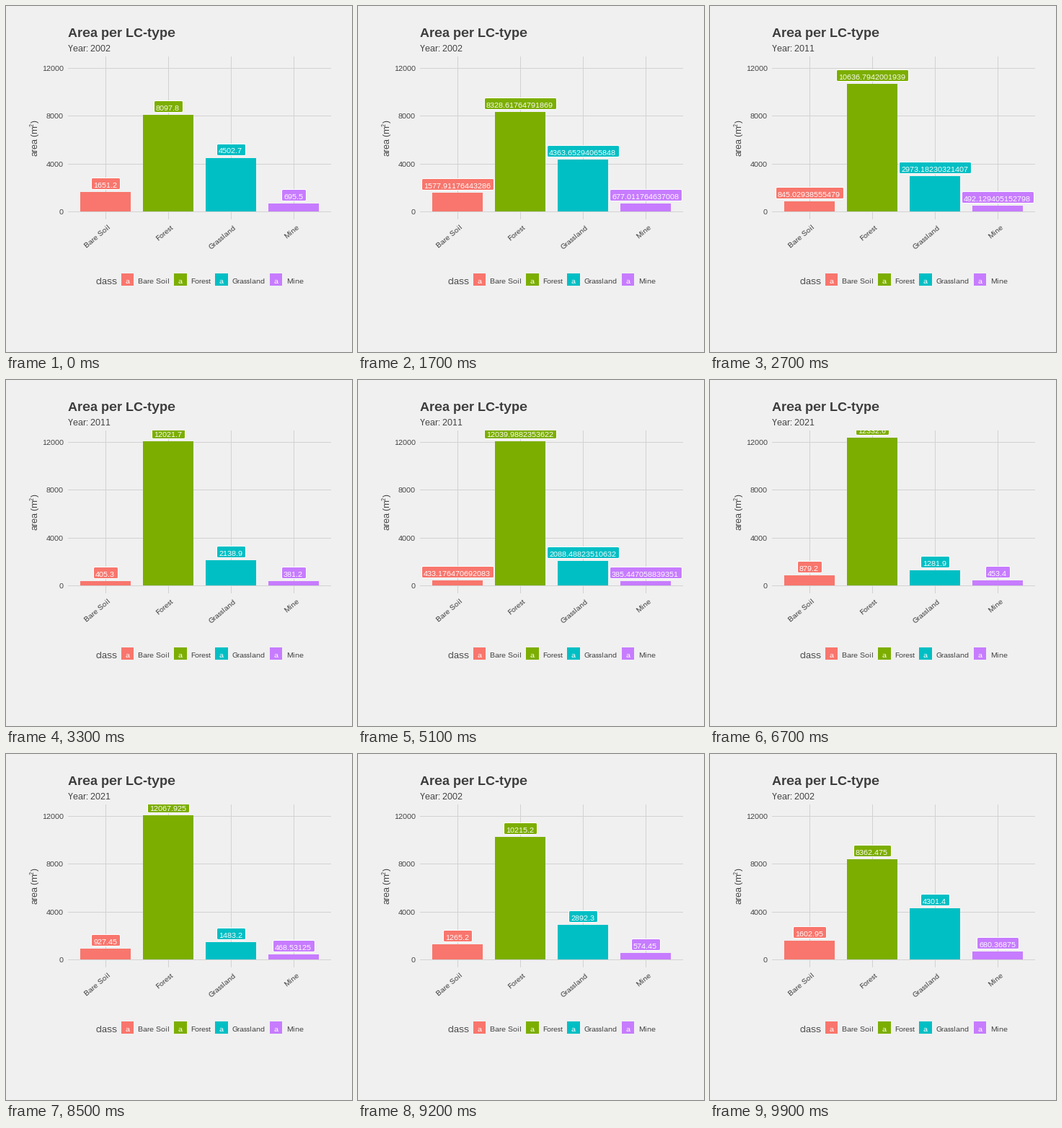
A matplotlib script that plays this animation: 480x480 px, repeating every 10000 ms.

```python
import numpy as np
import matplotlib.pyplot as plt
from matplotlib.animation import FuncAnimation
from matplotlib.patches import FancyBboxPatch, Rectangle

plt.rcParams.update({
    "font.family": "Liberation Sans",
    "text.hinting": "default",
    "text.hinting_factor": 1,
    "text.kerning_factor": 6,
    "mathtext.default": "regular",
    "toolbar": "None",
})

SIZE, DPI = 480, 100
PX = 72 / DPI                       # points per pixel
BG, GRID, INK = "#F0F0F0", "#D2D2D2", "#3C3C3C"
NAMES = ["Bare Soil", "Forest", "Grassland", "Mine"]
COLORS = ["#F8766D", "#7CAE00", "#00BFC4", "#C77CFF"]

YEARS = [2002, 2011, 2021]
AREAS = np.array([
    [1651.2, 8097.8, 4502.7, 695.5],
    [405.3, 12021.7, 2138.9, 381.2],
    [879.2, 12332.6, 1281.9, 453.4],
])
SPANS = [(16, 17), (50, 17), (84, 16)]   # last held step, length of the tween
FRAMES, INTERVAL = 100, 100

LEFT, RIGHT, TOP, BOTTOM = 86, 451, 70, 296
UNIT = (RIGHT - LEFT) / 4.2
CENTERS = LEFT + UNIT * (0.6 + np.arange(4))
ZERO, SCALE = 285.45, 0.01664
KEY = 17.28                         # legend key side
PAD, BOX_H = 3.6, 16                # label padding and height


def snap(v):
    return int(np.floor(v + 0.5))


def y_of(area):
    return ZERO - area * SCALE


def pixel_axes(x0, y0, x1, y1):
    ax = fig.add_axes([x0 / SIZE, 1 - y1 / SIZE,
                       (x1 - x0) / SIZE, (y1 - y0) / SIZE])
    ax.set_xlim(x0, x1)
    ax.set_ylim(y1, y0)
    ax.axis("off")
    return ax


def write(ax, x, y, s, px, color=INK, **kw):
    kw = {"ha": "left", "va": "baseline", **kw}
    return ax.text(x, y, s, fontsize=px * PX, color=color, **kw)


fig = plt.figure(figsize=(SIZE / DPI, SIZE / DPI), dpi=DPI, facecolor=BG)
page = pixel_axes(0, 0, SIZE, SIZE)
panel = pixel_axes(LEFT, TOP, RIGHT, BOTTOM)

# Headings and axis titles
write(page, 86, 43, "Area per LC-type", 18, weight="bold")
subtitle = write(page, 86, 63, "", 12)
write(page, 45, 183.5, "area (m$^2$)", 12, rotation=90,
      rotation_mode="anchor", ha="center")

# Grid and tick labels; one-pixel lines snap to the pixel they start on
for area in range(0, 12001, 4000):
    row = snap(y_of(area))
    panel.plot([LEFT, RIGHT], [row, row], color=GRID, lw=PX, zorder=1)
    write(page, 80, row + 4, str(area), 10, ha="right")
for cx, name in zip(CENTERS, NAMES):
    col = snap(cx)
    panel.plot([col, col], [TOP, BOTTOM], color=GRID, lw=PX, zorder=1)
    write(page, col + 8, 308, name, 10, rotation=40,
          rotation_mode="anchor", ha="right")

# Legend
write(page, 124, 386, "class", 12)
for x, name, color in zip([160, 233.3, 290.3, 366], NAMES, COLORS):
    x0, x1 = snap(x), snap(x + KEY)
    page.add_patch(Rectangle((x0, 371), x1 - x0, 17, fc=color, lw=0))
    write(page, x0 + 6, 385, "a", 10, "white")
    write(page, x0 + 23, 385, name, 10)

# Bars with value labels
bars, boxes, labels = [], [], []
for i, (cx, color) in enumerate(zip(CENTERS, COLORS)):
    x0, x1 = snap(cx - 0.4 * UNIT), snap(cx + 0.4 * UNIT)
    bar = Rectangle((x0, ZERO), x1 - x0, 0, fc=color, lw=0, zorder=2)
    box = FancyBboxPatch((cx, ZERO), 10, 10, fc=color, ec="white", lw=PX,
                         boxstyle="round,pad=0,rounding_size=2", zorder=3 + i)
    bars.append(panel.add_patch(bar))
    boxes.append(panel.add_patch(box))
    labels.append(write(panel, cx, ZERO, "", 10, "white",
                        clip_on=True, zorder=3.5 + i))


def state(frame):
    """Year and four areas; the tween runs in single precision."""
    seg = sum(frame > start + n for start, n in SPANS[:-1])
    start, n = SPANS[seg]
    t = float(np.float32(np.clip(frame - start, 0, n) / n))
    nxt = (seg + 1) % len(YEARS)
    areas = AREAS[seg] + (AREAS[nxt] - AREAS[seg]) * t
    return YEARS[nxt if t >= 0.5 else seg], areas


def update(frame):
    year, areas = state(frame)
    subtitle.set_text(f"Year: {year}")
    for cx, area, bar, box, label in zip(CENTERS, areas, bars, boxes, labels):
        y = y_of(area)
        top = snap(y)
        bar.set_y(top)
        bar.set_height(snap(ZERO) - top)

        text = f"{area:.15g}"
        half = (6 * len(text) - 3 * text.count(".")) / 2
        x0, x1 = snap(cx - half - PAD), snap(cx + half + PAD)
        y0, y1 = snap(y - 1.25 * BOX_H), snap(y - 0.25 * BOX_H)
        box.set_bounds(x0 + 0.5, y0 + 0.5, x1 - x0, y1 - y0)
        label.set_text(text)
        label.set_position((int(cx - half), snap(y - 6.1)))
    return [subtitle, *bars, *boxes, *labels]


anim = FuncAnimation(fig, update, frames=FRAMES, interval=INTERVAL,
                     init_func=lambda: update(0), repeat=True, blit=False)
plt.show()
```
